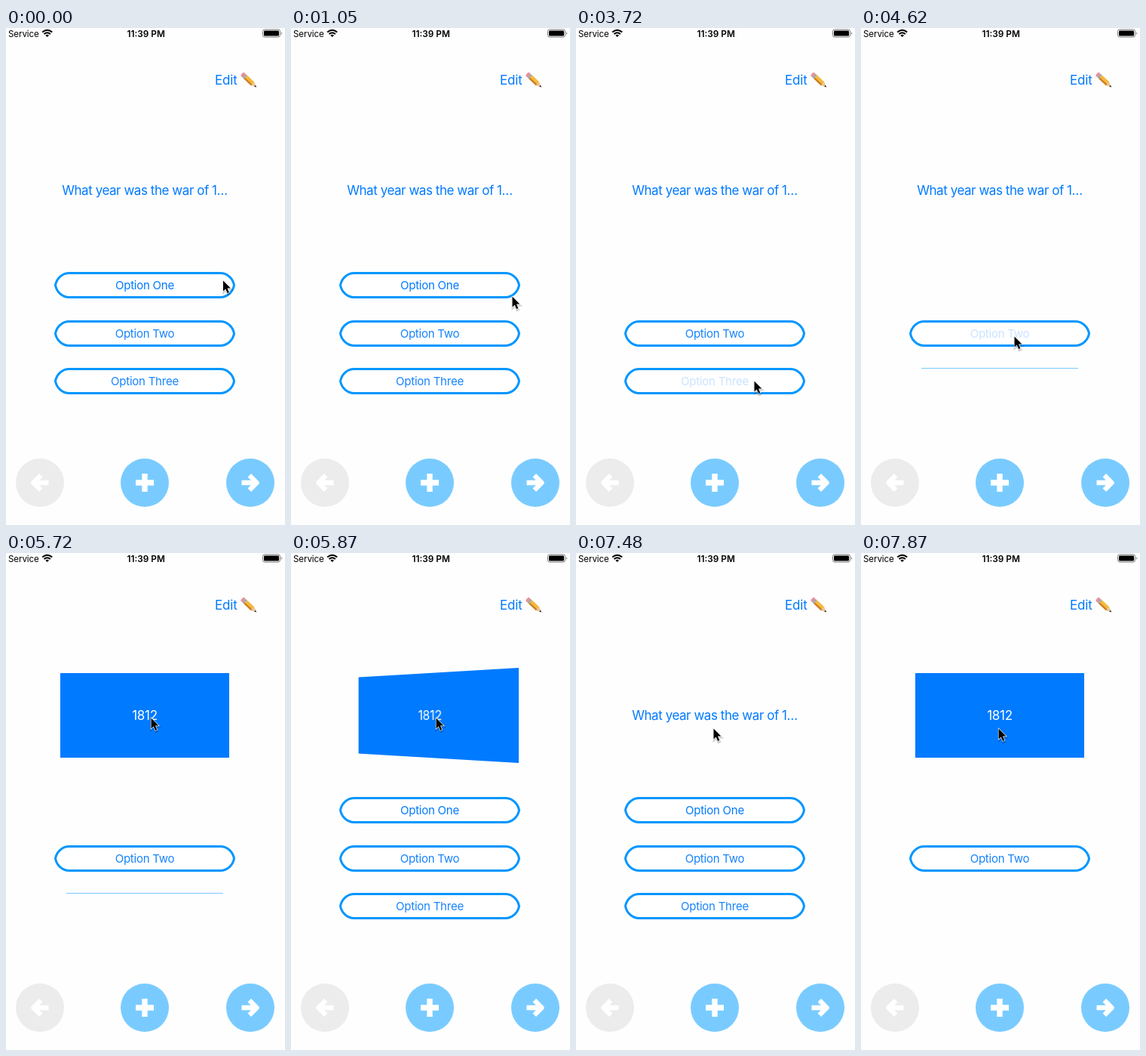
An HTML page that plays this animation: 370x658 px, repeating every 8000 ms.

```html
<!DOCTYPE html>
<html lang="en">
<head>
<meta charset="utf-8">
<title>Flashcard</title>
<style>
  html, body { margin: 0; width: 100%; height: 100%; overflow: hidden; background: #fefefe; }
  body { position: relative; font-family: Inter, Roboto, sans-serif; }
  svg { position: absolute; left: 0; top: 0; width: 370px; height: 658px; }
  text { text-anchor: middle; }
  .option path { fill: #fff; stroke: #0096ff; stroke-width: 3; }
  .option text { fill: #1683fb; font-size: 15px; letter-spacing: -.24px; }
  #one text { fill: #007aff; }
  .icon { fill: none; stroke: #fff; stroke-width: 6.4; stroke-linejoin: round; }
  #card {
    position: absolute; left: 72px; top: 159px; width: 224px; height: 112px;
    font-size: 17px; line-height: 112px; text-align: center; white-space: nowrap;
    letter-spacing: -.45px; color: #007aff;
  }
  #card.answer { background: #007aff; color: #fff; letter-spacing: -.3px; }
</style>
</head>
<body>
<svg viewBox="0 0 370 658">
  <!-- status bar -->
  <text x="3" y="11.5" font-size="11.6" letter-spacing="-.1" style="text-anchor:start">Service</text>
  <g fill="none" stroke="#000" stroke-width="2">
    <path d="M48.2 5.6Q54.7-.2 61.2 5.6M50.5 8.1Q54.7 4.4 58.9 8.1"/>
    <path d="M52.4 9.7Q54.7 7.8 57 9.7L54.7 12Z" fill="#000" stroke="none"/>
  </g>
  <text x="185.7" y="11.5" font-size="11.8" font-weight="600">11:39 PM</text>
  <rect x="340.5" y="2" width="23" height="10" rx="2.6" fill="none" stroke="#777"/>
  <rect x="342" y="3.5" width="20" height="7" rx="1.3"/>
  <path d="M365 5.2Q367.4 7 365 8.8Z" fill="#777"/>

  <text x="277" y="75" font-size="17" letter-spacing="-.2" fill="#007aff" style="text-anchor:start">Edit</text>
  <g transform="translate(313.6 61.2) rotate(43)">
    <rect x="-1" y="-3.2" width="4.5" height="6.4" rx="1.6" fill="#e9919a"/>
    <rect x="2.7" y="-3.2" width="3" height="6.4" fill="#a5abb0"/>
    <rect x="5.5" y="-3.2" width="13" height="6.4" fill="#f5b83d"/>
    <path d="M5.5 1H18.5V3.2H5.5Z" fill="#cb7d25"/>
    <path d="M18.5-3.2L25 0 18.5 3.2Z" fill="#e8c69b"/>
    <path d="M22.5-1.3L25.5 0 22.5 1.3Z" fill="#333"/>
  </g>

  <path id="line" d="M80 450.5H288" stroke="#7ccaff"/>
  <g id="options"></g>

  <!-- bottom controls -->
  <circle cx="45" cy="602" r="32" fill="#ececec"/>
  <circle cx="184" cy="602" r="32" fill="#79cbff"/>
  <circle cx="324" cy="602" r="32" fill="#79cbff"/>
  <g class="icon">
    <path id="arrow" d="M46.2 592.3L36.5 602 46.2 611.7M37 602H56.5"/>
    <path d="M184 590V614M172 602H196" stroke-width="7.4"/>
    <use href="#arrow" transform="matrix(-1 0 0 1 369 0)"/>
  </g>
</svg>

<div id="card"></div>

<svg viewBox="0 0 370 658">
  <g id="cursor">
    <path d="M0 0V15L3.5 11.8 6 17.4 8.6 16.3 6.2 10.8H11Z" transform="translate(.6 1.8)" opacity=".18" stroke="#000" stroke-width="2"/>
    <path d="M.5.5V14.5L3.7 11.5 6.1 17 8.3 16 6 10.6H10.4Z" stroke="#fff" stroke-width="1.3" paint-order="stroke"/>
  </g>
</svg>

<script>
const DURATION = 8000;
const $ = id => document.getElementById(id);

const pill = 'M65.5 17.5C67 9 74 1.5 84 1.5H284C294 1.5 301 9 302.5 17.5' +
             'C301 26 294 33.5 284 33.5H84C74 33.5 67 26 65.5 17.5Z';
$('options').innerHTML = [['one', 'One', 323], ['two', 'Two', 387], ['three', 'Three', 450]]
  .map(([id, label, y]) => `<g class="option" id="${id}" transform="translate(0 ${y})">
    <path d="${pill}"/><text x="184" y="23">Option ${label}</text></g>`).join('');

// Pointer moves: first step, last step, number of steps, destination
const moves = [
  [150, 150, 1, 299, 357], [450, 1050, 5, 293, 355], [1500, 1940, 4, 276, 344],
  [2680, 2830, 2, 240, 448], [3130, 3430, 3, 236, 467], [3870, 4170, 3, 212, 418],
  [4320, 4470, 2, 203, 408], [5070, 5280, 2, 195, 243], [5570, 5720, 2, 192, 218],
  [6440, 6880, 4, 178, 229], [7480, 7480, 1, 182, 232]
];

function pointerAt(t) {
  let x = 287.5, y = 334;
  for (const [start, end, steps, toX, toY] of moves) {
    if (t < start) break;
    const gap = (end - start) / (steps - 1) || 1;
    const progress = Math.min(steps, Math.floor((t - start) / gap + 1e-6) + 1) / steps;
    x += (toX - x) * progress;
    y += (toY - y) * progress;
  }
  return [x, y];
}

const within = (t, start, end) => t >= start && t < end;
const show = (id, visible) => { $(id).style.display = visible ? '' : 'none'; };
const dim = (id, pressed) => { $(id).querySelector('text').style.opacity = pressed ? .22 : 1; };

function render(t) {
  show('one', !within(t, 2390, 5870) && t < 7630);
  show('three', !within(t, 3730, 5870) && t < 7630);
  show('line', within(t, 3730, 5870));
  dim('three', within(t, 3580, 3730));
  dim('two', within(t, 4620, 5070));

  const answer = within(t, 4770, 6140) || t >= 7630;
  const angle = within(t, 5870, 6140) ? -20.5 : within(t, 7630, 7870) ? 20.5 : 0;
  $('card').className = answer ? 'answer' : '';
  $('card').textContent = answer ? '1812' : 'What year was the war of 1…';
  $('card').style.transform = angle ? `perspective(353px) rotateY(${angle}deg)` : 'none';

  $('cursor').setAttribute('transform', `translate(${pointerAt(t)})`);
}

const origin = performance.now();
function tick() {
  render((performance.now() - origin) % DURATION);
  requestAnimationFrame(tick);
}
tick();
</script>
</body>
</html>
```
